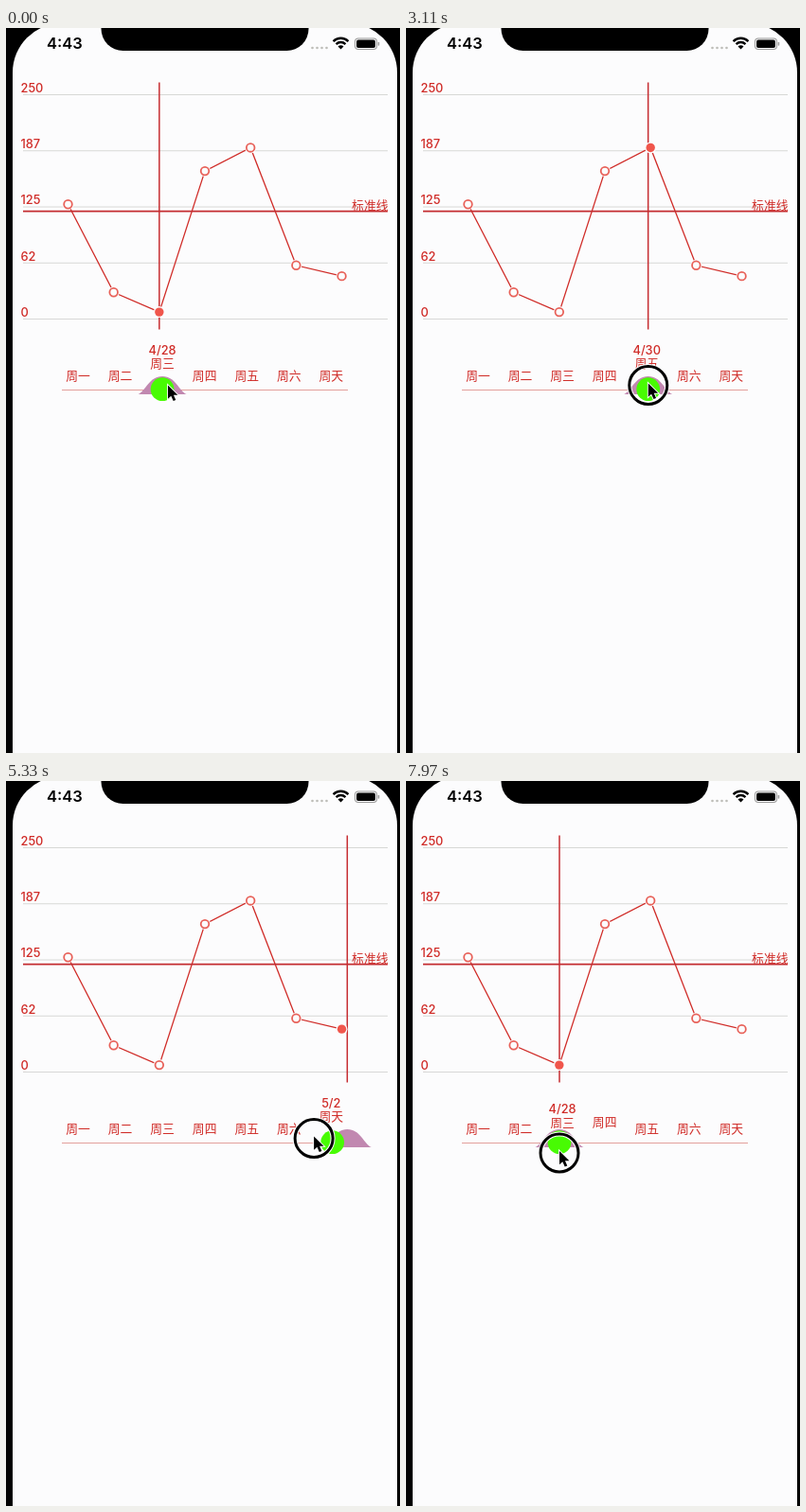
Animation of 416x766 px, one loop 8 s. Source, as an HTML page with a canvas:

```html
<!DOCTYPE html>
<html lang="zh">
<head>
<meta charset="utf-8">
<style>
  html, body { margin: 0; width: 100%; height: 100%; overflow: hidden; background: #000; }
  canvas { display: block; width: 416px; height: 766px; }
</style>
</head>
<body>
<canvas id="stage"></canvas>
<script>
const W = 416, H = 766, LOOP = 8000;
const RED = '#d02c28', PAPER = '#fcfcfd';
const FONT = '"Inter", "Noto Sans CJK SC", "Noto Sans CJK", sans-serif';
const canvas = document.getElementById('stage');
const ctx = canvas.getContext('2d');
const ratio = window.devicePixelRatio || 1;
canvas.width = W * ratio;
canvas.height = H * ratio;

const days = [...'一二三四五六天'].map(c => '周' + c);
const dates = days.map((_, i) => i < 5 ? `4/${26 + i}` : `5/${i - 4}`);
const values = [128, 30, 8, 165, 191, 60, 48];
const valueY = v => 307.7 - v * 0.949;
const pointX = i => 65.5 + 48.17 * i;
const labelX = i => 76 + 44.55 * i;
const nearestPoint = x => Math.round((x - 65.5) / 48.17);
const nearestDay = x => Math.round((x - 76) / 44.55);

const clamp = v => Math.max(0, Math.min(1, v));
const smooth = v => v * v * (3 - 2 * v);
const mix = (a, b, p) => a + (b - a) * p;

// Finger strokes: time, x. Ball and guide follow the finger with a delay.
const strokes = [
  [0, 171], [250, 164], [830, 174], [1010, 223], [1200, 210], [2065, 211],
  [2180, 263], [2350, 254], [3210, 256], [3400, 302], [3840, 302], [3950, 356],
  [4300, 350], [5280, 365], [5335, 322], [5420, 343], [5925, 340],
  [6070, 282], [6200, 298], [6500, 298], [7000, 209], [7670, 209], [7820, 162], [8000, 162]
];
const BALL_LAG = 25, GUIDE_LAG = 45, START_DAY = 2;

function fingerX(time) {
  const t = Math.max(0, time);
  const n = strokes.findIndex(key => key[0] > t);
  const [t0, x0] = strokes[n - 1], [t1, x1] = strokes[n];
  return mix(x0, x1, (t - t0) / (t1 - t0));
}
const fingerY = t => 377.5 + 15.5 * smooth(clamp((t - 6400) / 1500));

// A day is picked when the guide crosses halfway to it.
const picks = [{ time: -1000, day: START_DAY }];
for (let time = 0; time < LOOP; time += 5) {
  const day = nearestDay(fingerX(time - GUIDE_LAG));
  if (day !== picks.at(-1).day) picks.push({ time, day });
}

function line(x1, y1, x2, y2, color, width, dash = []) {
  ctx.beginPath();
  ctx.setLineDash(dash);
  ctx.moveTo(x1, y1);
  ctx.lineTo(x2, y2);
  ctx.strokeStyle = color;
  ctx.lineWidth = width;
  ctx.stroke();
  ctx.setLineDash([]);
}

function disc(x, y, r, fill, stroke, width) {
  ctx.beginPath();
  ctx.arc(x, y, r, 0, 2 * Math.PI);
  if (fill) { ctx.fillStyle = fill; ctx.fill(); }
  if (stroke) { ctx.strokeStyle = stroke; ctx.lineWidth = width; ctx.stroke(); }
}

function box(x, y, w, h, r, color) {
  ctx.beginPath();
  ctx.roundRect(x, y, w, h, r);
  ctx.fillStyle = color;
  ctx.fill();
}

function text(str, x, y, align = 'center', font = '500 12.8px', color = RED) {
  ctx.font = `${font} ${FONT}`;
  ctx.textAlign = align;
  ctx.fillStyle = color;
  ctx.fillText(str, x, y + 4.8);
}

function phone() {
  ctx.fillStyle = '#000';
  ctx.fillRect(0, 0, W, H);
  box(7, -5, 406, H + 20, [52, 52, 0, 0], PAPER);
  box(100.5, -10, 219, 34, [0, 0, 23, 23], '#000');
  text('4:43', 43, 17, 'left', '600 16.5px', '#000');
  for (let i = 0; i < 4; i++) disc(323.5 + 5 * i, 21, 1.3, '#bdbdb8');
  const up = -Math.PI / 2, half = Math.PI / 4;
  for (const r of [11.2, 7]) {
    ctx.beginPath();
    ctx.arc(353.5, 22, r, up - half, up + half);
    ctx.strokeStyle = '#000';
    ctx.lineWidth = 2.4;
    ctx.stroke();
  }
  ctx.beginPath();
  ctx.moveTo(353.5, 22.5);
  ctx.arc(353.5, 22.5, 4.2, up - half, up + half);
  ctx.fillStyle = '#000';
  ctx.fill();
  box(368, 10.5, 24, 12.5, 4, '#9a9a9a');
  box(369, 11.5, 22, 10.5, 3, PAPER);
  box(370, 12.5, 20, 8.5, 2, '#000');
  box(392.7, 14.7, 1.5, 4, 1, '#9a9a9a');
}

function chart(guide) {
  for (let i = 0; i < 5; i++) {
    const y = 70.5 + 59.25 * i;
    line(18, y, 403, y, '#d7d8d6', 1);
    text(Math.floor(250 - 62.4 * i), 15.5, y - 7.5, 'left');
  }
  ctx.beginPath();
  values.forEach((v, i) => ctx.lineTo(pointX(i), valueY(v)));
  ctx.strokeStyle = RED;
  ctx.lineWidth = 1.3;
  ctx.stroke();
  line(18, 193.7, 403, 193.7, '#c42c30', 1.7);
  text('标准线', 403.5, 187.5, 'right');
  line(guide, 57.5, guide, 318.5, '#c62c30', 1.5);
  values.forEach((v, i) => {
    const x = pointX(i), y = valueY(v);
    disc(x, y, 6, PAPER);
    if (i === nearestPoint(guide)) disc(x, y, 4.7, '#f0564c');
    else disc(x, y, 4.3, PAPER, '#e8625a', 1.8);
  });
}

function slider(bump, ball) {
  line(59, 382.5, 361, 382.5, '#e3a09c', 1);
  ctx.beginPath();
  ctx.moveTo(bump - 25.5, 387);
  ctx.bezierCurveTo(bump - 17, 383, bump - 14, 368, bump, 368);
  ctx.bezierCurveTo(bump + 14, 368, bump + 17, 383, bump + 25.5, 387);
  ctx.fillStyle = '#c188b0';
  ctx.fill();
  disc(ball, 381.7, 12.4, '#48fb03');
}

function labels(t) {
  const last = picks.findLastIndex(pick => pick.time <= t);
  const { time, day: current } = picks[last];
  const previous = picks[last - 1]?.day;
  const p = smooth(clamp((t - time) / 300));
  days.forEach((day, i) => {
    const x = labelX(i);
    if (i === current) {
      const y = mix(367, 347.3, p), h = mix(15, 32, p);
      ctx.save();
      ctx.beginPath();
      ctx.rect(x - 22, y - h / 2, 44, h);
      ctx.clip();
      text(dates[i], x, y - 7.2);
      text(day, x, y + 7.2);
      ctx.restore();
    } else {
      text(day, x, i === previous ? mix(347.3, 367, p) : 367);
    }
  });
}

function pointer(x, y, held) {
  if (held) {
    disc(x, y, 20, null, '#fff', 5);
    disc(x, y, 20, null, '#000', 3);
  }
  ctx.save();
  ctx.translate(x, held ? y - 2 : y);
  ctx.scale(0.92, 0.92);
  const arrow = new Path2D('M0 0V15.5L3.6 12.2L6.2 18L9 16.8L6.5 11.2H11.3Z');
  ctx.strokeStyle = '#fff';
  ctx.lineWidth = 2;
  ctx.stroke(arrow);
  ctx.fillStyle = '#000';
  ctx.fill(arrow);
  ctx.restore();
}

function draw(t) {
  const held = t >= 20;
  const follow = fingerX(t - GUIDE_LAG);
  const rest = labelX(START_DAY);
  ctx.setTransform(ratio, 0, 0, ratio, 0, 0);
  phone();
  chart(held ? follow : pointX(START_DAY));
  slider(held ? follow : rest, held ? fingerX(t - BALL_LAG) : rest);
  labels(t);
  pointer(fingerX(t), fingerY(t), held);
}

const start = performance.now();
function tick() {
  draw((performance.now() - start) % LOOP);
  requestAnimationFrame(tick);
}
tick();
</script>
</body>
</html>
```
